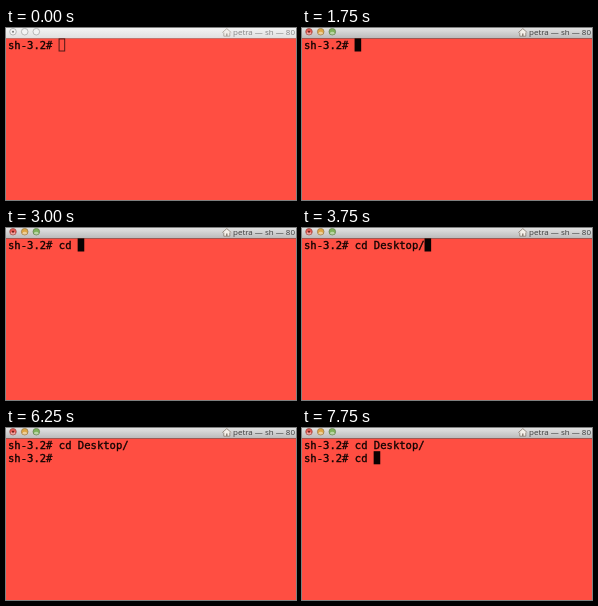
These frames come from a looping animation (290x172 px, 8000 ms). An HTML page:

```html
<!DOCTYPE html>
<html lang="en">
<head>
<meta charset="utf-8">
<title>Terminal</title>
<style>
  html, body { margin: 0; width: 100%; height: 100%; overflow: hidden; background: #ff4e42; }
  svg { display: block; width: 290px; height: 172px; }
  .line { font: 10.56px "DejaVu Sans Mono", monospace; white-space: pre; fill: #130403; stroke: #130403; stroke-width: .35px; }
  .title { font: 8px "Open Sans", sans-serif; fill: #3c3c3c; }
  .ring { stroke-width: .7; }
  .idle .title { fill: #858585; }
  .idle .ring { fill: #f3f3f3; stroke: #a3a3a3; }
  .idle .dot { fill: #777; }
  .idle .shine { display: none; }
  .idle .house { opacity: .65; }
</style>
</head>
<body>
<svg id="stage" viewBox="0 0 290 172">
  <defs>
    <linearGradient id="lit" x2="0" y2="1">
      <stop stop-color="#e2e2e2"/><stop offset="1" stop-color="#bcbcbc"/>
    </linearGradient>
    <linearGradient id="dim" x2="0" y2="1">
      <stop stop-color="#f3f3f3"/><stop offset="1" stop-color="#e0e0e0"/>
    </linearGradient>
  </defs>
  <rect width="290" height="172" fill="#ff4e42"/>
  <rect id="bar" width="290" height="10"/>
  <rect id="edge" y="10" width="290" height="1"/>
  <circle class="ring" cx="7" cy="3.7" r="3.3" fill="#e2564e" stroke="#96504b"/>
  <circle class="ring" cx="18.7" cy="3.7" r="3.3" fill="#dfa643" stroke="#94764a"/>
  <circle class="ring" cx="30.3" cy="3.7" r="3.3" fill="#7fb25a" stroke="#607d4e"/>
  <g class="shine" fill="#fff" fill-opacity=".45">
    <ellipse cx="7" cy="5.2" rx="2.2" ry="1.4"/>
    <ellipse cx="18.7" cy="5.2" rx="2.2" ry="1.4"/>
    <ellipse cx="30.3" cy="5.2" rx="2.2" ry="1.4"/>
  </g>
  <circle class="dot" cx="7" cy="3.7" r="1" fill="#651914"/>
  <g class="house" stroke="#85796f" stroke-width=".8" stroke-linejoin="round">
    <path d="M217.8 4V8.2H223.8V4" fill="#f4efe8"/>
    <path d="M216.3 4.6L220.8 .6L225.3 4.6" fill="#f4efe8"/>
    <path d="M220.8 8V5.6" stroke-width="1.4"/>
  </g>
  <text class="title" x="227" y="6.8">petra — sh — 80</text>
  <rect id="cursor"/>
  <text class="line" x="2" y="21"></text>
  <text class="line" x="2" y="33.8"></text>
</svg>
<script>
  const LOOP = 8000, CELL = 6.36, LEAD = 12.8, PROMPT = "sh-3.2# ";
  const CD = "cd Desktop/";

  // start time, typed lines, cursor state
  const steps = [
    [0, [""], "hollow"],
    [750, [""], "on"],
    [1250, [""], "off"],
    [1750, [""], "on"],
    [2250, [""], "off"],
    [2750, ["c"], "on"],
    [3000, ["cd "], "on"],
    [3250, ["cd D"], "on"],
    [3500, ["cd De"], "on"],
    [3750, [CD], "on"],
    [5250, [CD, ""], "on"],
    [6250, [CD, ""], "off"],
    [6750, [CD, ""], "on"],
    [7000, [CD, "c"], "on"],
    [7250, [CD, "cd"], "on"],
    [7750, [CD, "cd "], "on"]
  ];

  const $ = id => document.getElementById(id);
  const rows = document.querySelectorAll(".line");
  const set = (el, attrs) => {
    for (const key in attrs) el.setAttribute(key, attrs[key]);
  };
  let shown = null;

  function show(step) {
    if (step === shown) return;
    shown = step;
    const [, typed, state] = step;
    const idle = state === "hollow";
    $("stage").classList.toggle("idle", idle);
    set($("bar"), { fill: idle ? "url(#dim)" : "url(#lit)" });
    set($("edge"), { fill: idle ? "#c4726b" : "#a05852" });
    rows.forEach((row, i) => {
      row.textContent = i < typed.length ? PROMPT + typed[i] : "";
    });

    const last = typed.length - 1;
    const x = 1.7 + CELL * (PROMPT.length + typed[last].length);
    const y = 10.4 + LEAD * last;
    const inset = idle ? 0.5 : 0;
    set($("cursor"), {
      x: x + inset, y: y + inset,
      width: 6.6 - 2 * inset, height: 13.1 - 2 * inset,
      fill: idle ? "none" : "#080202",
      stroke: idle ? "#501a16" : "none",
      visibility: state === "off" ? "hidden" : "visible"
    });
  }

  const start = performance.now();
  function tick() {
    const t = (performance.now() - start) % LOOP;
    show(steps.findLast(step => step[0] <= t));
    requestAnimationFrame(tick);
  }
  tick();
</script>
</body>
</html>
```
